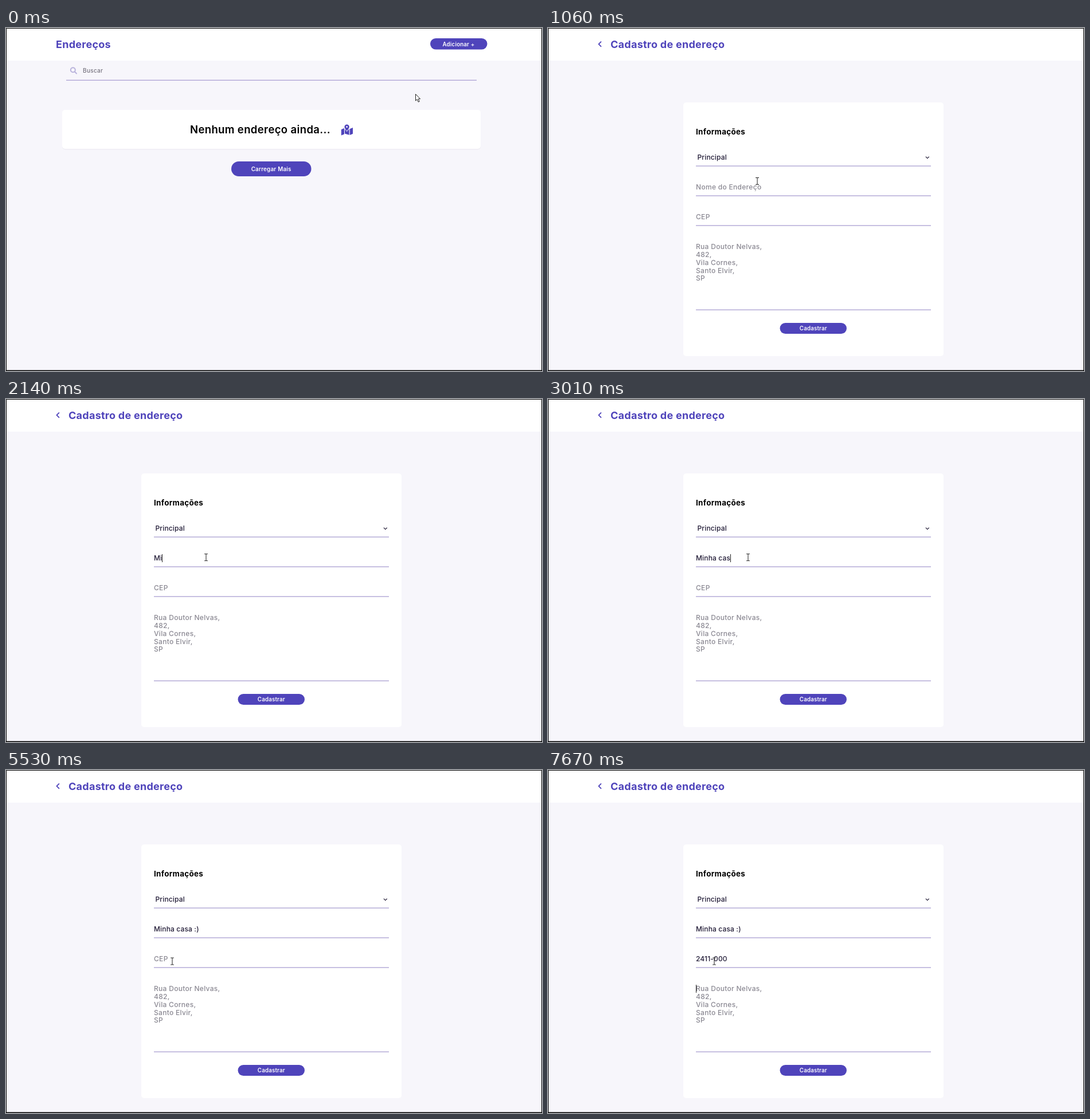
Recreate the animation shown at these times as an HTML page. Size 935x599 px, loop 8000 ms.

```html
<!DOCTYPE html>
<html lang="pt-BR">
<head>
<meta charset="utf-8">
<title>Endereços</title>
<style>
  html, body { margin: 0; width: 100%; height: 100%; overflow: hidden; background: #f7f6fb; }
  svg { display: block; width: 935px; height: 599px; }
  text { font: 500 12px Inter, "Open Sans", sans-serif; letter-spacing: .025em; white-space: pre; fill: #8a8892; }
  .title { font-size: 18px; font-weight: 700; letter-spacing: .015em; fill: #4f44bb; }
  .empty { font-size: 18.5px; font-weight: 600; letter-spacing: .02em; fill: #000; }
  .legend { font-size: 13.4px; font-weight: 700; letter-spacing: .025em; fill: #000; }
  .label { font-size: 9.7px; font-weight: 600; letter-spacing: .02em; fill: #fff; text-anchor: middle; }
  .value { letter-spacing: .012em; fill: #211b36; }
  .brand { fill: #4f44bb; }
  .rule { stroke: #b5acd8; stroke-width: 1.5; }
  .stroke { fill: none; stroke-linecap: round; stroke-linejoin: round; }
</style>
</head>
<body>
<svg viewBox="0 0 935 599">
  <rect width="935" height="599" fill="#f7f6fb"/>
  <rect width="935" height="57" fill="#fff"/>

  <g id="list">
    <text class="title" x="87" y="34.5">Endereços</text>
    <rect id="add" x="740" y="18" width="99.5" height="19.5" rx="9.75"/>
    <text class="label" x="789.5" y="31.5">Adicionar +</text>
    <g class="stroke" stroke="#b9b3dc" stroke-width="2">
      <circle cx="116.8" cy="73.3" r="4"/>
      <path d="M120 76.5l3 3"/>
    </g>
    <text x="134" y="78" style="font-size:10.1px;fill:#76737f">Buscar</text>
    <path class="rule" d="M105 91.3H821"/>
    <rect x="98" y="144.5" width="730" height="68" rx="5" fill="#efedf4"/>
    <rect x="98" y="143" width="730" height="68" rx="5" fill="#fff"/>
    <text class="empty" x="321" y="183.7">Nenhum endereço ainda...</text>
    <g class="brand">
      <path d="M584.8 177.2l5.2-2.2v10.4l-5.2 2zM591 176.5l3.6 4.5 4-4.8v10.6l-7.6-2.4zM599.7 176.3l5.3-2.3v10.8l-5.3 2.2z"/>
      <path d="M594.6 179.8c-2-2.7-4.2-5-4.2-7.1a4.2 4.2 0 0 1 8.4 0c0 2.1-2.2 4.4-4.2 7.1z"/>
      <circle cx="594.6" cy="172.7" r="1.4" fill="#fff"/>
    </g>
    <rect class="brand" x="393" y="233" width="139.5" height="26" rx="13"/>
    <text class="label" x="462.7" y="249.8" style="font-size:9.9px">Carregar Mais</text>
  </g>

  <g id="form">
    <path class="stroke" d="M92.4 24.2l-4 4 4 4" stroke="#4f44bb" stroke-width="1.8"/>
    <text class="title" x="109" y="34.5">Cadastro de endereço</text>
    <rect x="236" y="130" width="454" height="443" rx="5" fill="#fff"/>
    <text class="legend" x="258" y="186.2">Informações</text>
    <text class="value" x="260.5" y="230.3">Principal</text>
    <path class="stroke" d="M659.2 225l2.6 2.6 2.6-2.6" stroke="#211b36" stroke-width="1.1"/>
    <path class="rule" d="M258 241H668m-410 52h410m-410 52h410M258 492.2H668"/>
    <text id="name" x="258" y="282.2"></text>
    <text id="cep" x="258" y="334"></text>
    <text>
      <tspan x="258" y="386">Rua Doutor Nelvas,</tspan>
      <tspan x="258" dy="13.85">482,</tspan>
      <tspan x="258" dy="13.85">Vila Cornes,</tspan>
      <tspan x="258" dy="13.85">Santo Elvir,</tspan>
      <tspan x="258" dy="13.85">SP</tspan>
    </text>
    <rect class="brand" x="404.5" y="515" width="116.5" height="19" rx="9.5"/>
    <text class="label" x="462.8" y="528.2">Cadastrar</text>
    <rect id="caret" width="1" height="14" fill="#222"/>
  </g>

  <path d="M.5 599V.5H934.5V599" fill="none" stroke="#000"/>
  <path d="M0 598.2H935" stroke="#000" stroke-width="1.6"/>
  <path id="arrow" d="M.5 .5V12L3.2 9.5 5.2 14.2 7.2 13.3 5.2 8.8H8.6Z" fill="#fff" stroke="#222"/>
  <path id="beam" class="stroke" d="M-2.5-6H-.8L0-5.5.8-6H2.5M0-5.5V5.5M-2.5 6H-.8L0 5.5.8 6H2.5" stroke="#333" stroke-width="1.1"/>
</svg>
<script>
const $ = id => document.getElementById(id);
const show = (el, on) => el.style.display = on ? '' : 'none';
const clamp = v => Math.min(1, Math.max(0, v));
const mix = (a, b, k) => a + (b - a) * k;

const LOOP = 8000, OPEN = 700, BLINK = 470;
const LEFT = 258, FORM_TOP = 255;

const start = { x: 714, y: 115 };
const moves = [
  { from: 100, to: 560, x: 783.5, y: 30, power: 2 },
  { from: 660, to: 1340, x: 349, y: 276.5, power: 3.7 },
  { from: 4470, to: 5090, x: 290, y: 334, power: 2 }
];

// Evenly spaced key presses
const burst = (from, step, count) => Array.from({ length: count }, (_, i) => from + i * step);

const fields = [
  { el: $('name'), hint: 'Nome do Endereço', text: 'Minha casa :)', top: 271,
    focus: 1690, blur: 3940, keys: [...burst(1930, 130, 10), ...burst(3350, 295, 3)] },
  { el: $('cep'), hint: 'CEP', text: '2411-000', top: 323,
    focus: 5060, blur: 7670, keys: [...burst(5760, 65, 3), ...burst(6210, 390, 2), ...burst(7120, 185, 3)] },
  { top: 375, focus: 7670, blur: LOOP, keys: [] }
];

function pointer(t) {
  return moves.reduce((p, m) => {
    const k = 1 - (1 - clamp((t - m.from) / (m.to - m.from))) ** m.power;
    return { x: mix(p.x, m.x, k), y: mix(p.y, m.y, k) };
  }, start);
}

function drawField({ el, hint, text, top, focus, blur, keys }, t) {
  const pressed = keys.filter(k => k <= t);
  const count = pressed.length;
  if (el) {
    el.textContent = count ? text.slice(0, count) : hint;
    el.setAttribute('class', count ? 'value' : '');
  }
  if (t < focus || t >= blur) return;

  // Each key press restarts the blink
  const since = t - (count ? pressed[count - 1] : focus);
  show($('caret'), since % (2 * BLINK) < BLINK);
  $('caret').setAttribute('x', LEFT + (count ? Math.round(el.getComputedTextLength()) : 0));
  $('caret').setAttribute('y', top);
}

function draw(t) {
  show($('list'), t < OPEN);
  show($('form'), t >= OPEN);

  const hover = clamp((t - 460) / 120);
  $('add').setAttribute('fill', `rgb(${mix(79, 59, hover)},${mix(68, 52, hover)},${mix(187, 143, hover)})`);

  show($('caret'), false);
  fields.forEach(f => drawField(f, t));

  const { x, y } = pointer(t);
  const overForm = t >= OPEN && y > FORM_TOP;
  for (const id of ['arrow', 'beam']) {
    $(id).setAttribute('transform', `translate(${x} ${y})`);
    show($(id), (id === 'beam') === overForm);
  }
}

function tick() {
  draw(performance.now() % LOOP);
  requestAnimationFrame(tick);
}
tick();
</script>
</body>
</html>
```
